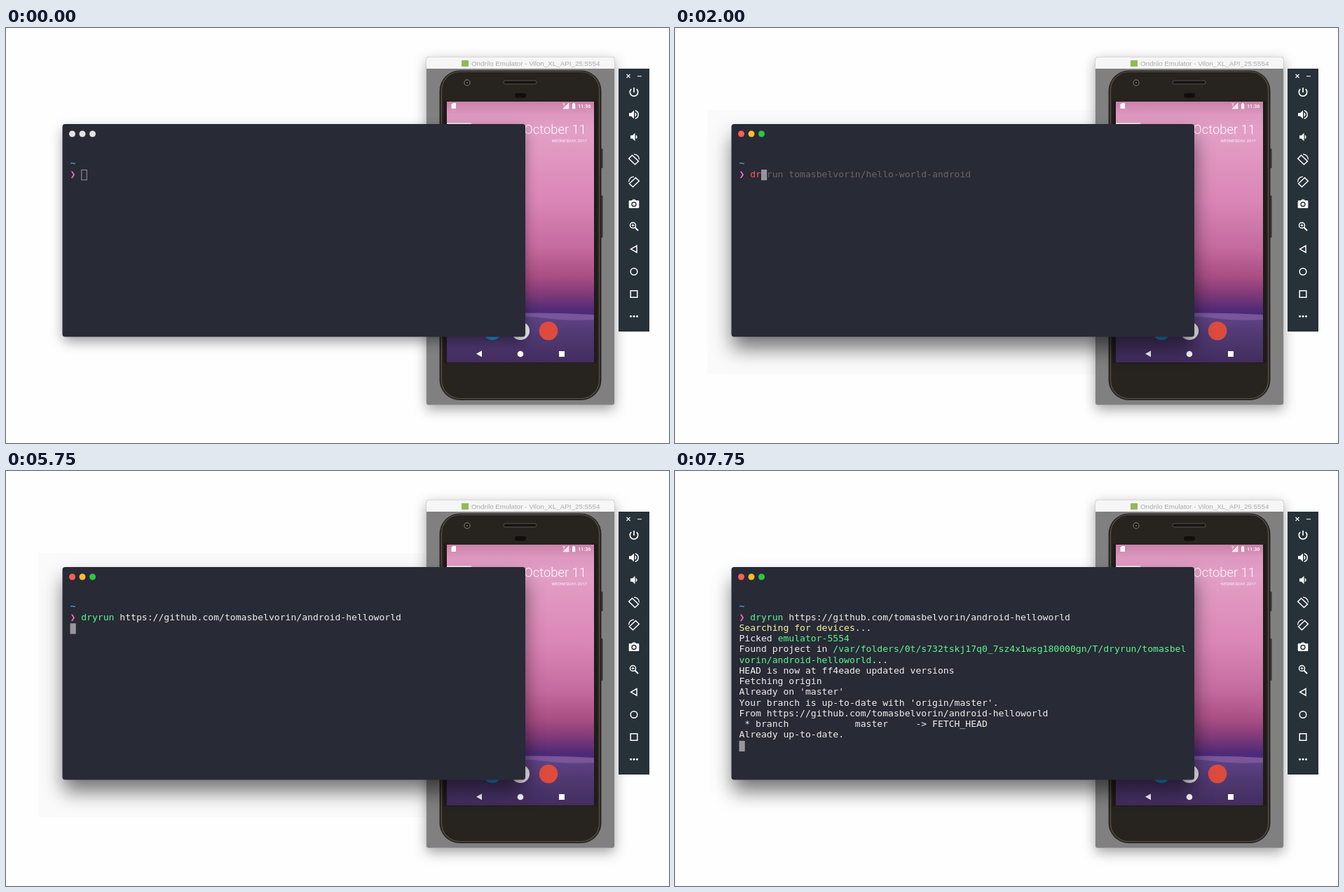
An HTML page for the animation above (8000 ms loop, 946 by 592 pixels).

```html
<!DOCTYPE html>
<html lang="en">
<head>
<meta charset="utf-8">
<title>Terminal and emulator</title>
<style>
  html, body { margin: 0; width: 100%; height: 100%; overflow: hidden; background: #fefefe; }
  svg { display: block; }
  .mono { font: 13.08px "DejaVu Sans Mono", "Liberation Mono", monospace; fill: #eff0eb; }
  .mono text, .mono tspan { white-space: pre; }
  .green { fill: #5af78e; }
  .red { fill: #ff5c57; }
  .yellow { fill: #f3f99d; }
  .ghost { fill: #686868; }
  .pink { fill: #ff6ac1; }
  .blue { fill: #57c7ff; }
  .title { font: 9.8px "Liberation Sans", sans-serif; fill: #a9a9a9; }
  .roboto { font-family: Roboto, sans-serif; fill: #fff; }
  .soft { filter: blur(9px); }
  .deep { filter: blur(14px); }
  .line { fill: none; stroke: #fff; stroke-width: 1.5; }
</style>
</head>
<body>
<svg width="946" height="592" viewBox="0 0 946 592">
  <defs>
    <linearGradient id="sky" gradientUnits="userSpaceOnUse" x1="0" y1="105" x2="0" y2="477">
      <stop offset="0" stop-color="#c981a8"/>
      <stop offset=".05" stop-color="#dd98bf"/>
      <stop offset=".12" stop-color="#e39fc6"/>
      <stop offset=".38" stop-color="#da86b6"/>
      <stop offset=".56" stop-color="#c46b9e"/>
      <stop offset=".67" stop-color="#aa4e83"/>
      <stop offset=".74" stop-color="#7f3a78"/>
      <stop offset=".8" stop-color="#4f2a77"/>
      <stop offset=".82" stop-color="#4b2a77"/>
    </linearGradient>
    <linearGradient id="hills" x1="0" y1="0" x2="0" y2="1">
      <stop offset="0" stop-color="#614489"/>
      <stop offset=".5" stop-color="#4e3870"/>
      <stop offset="1" stop-color="#422d5e"/>
    </linearGradient>
  </defs>

  <rect id="haze" x="46" y="117" width="620" height="377" fill="#fafafa"/>

  <!-- emulator window -->
  <rect class="soft" x="600" y="47" width="268" height="497" rx="4" fill-opacity=".36"/>
  <rect x="599.5" y="41" width="269" height="497" rx="4" fill="#bdbdbd"/>
  <path d="M600 58V45.500a4 4 0 0 1 4-4h260a4 4 0 0 1 4 4V58z" fill="#f6f6f6"/>
  <path d="M600 58h268v476a3.500 3.500 0 0 1-3.500 3.500h-261a3.500 3.500 0 0 1-3.500-3.500z" fill="#808080"/>
  <rect x="650" y="46" width="10" height="9" fill="#93b85c"/>
  <text class="title" x="664" y="54">Ondrilo Emulator - Vilon_XL_API_25:5554</text>

  <!-- phone -->
  <rect x="848" y="172" width="3.500" height="28" rx="1" fill="#38332e"/>
  <rect x="848" y="239" width="3.500" height="60" rx="1" fill="#38332e"/>
  <rect x="618.500" y="60.500" width="231" height="470.500" rx="29" fill="#2b2723"/>
  <rect x="621.500" y="62.500" width="225" height="466" rx="26" fill="#27231f" stroke="#59524a" stroke-width="1.200"/>
  <rect x="624" y="104" width="220" height="374" fill="#1f1c1a"/>
  <circle cx="658" cy="78" r="4" fill="#171412" stroke="#6d6761" stroke-width="1.400"/>
  <circle cx="658" cy="78" r="1.300" fill="#5b6068"/>
  <rect x="710" y="75" width="47" height="5" rx="2.500" fill="#151312" stroke="#5e5852" stroke-width=".9"/>
  <rect x="726" y="93" width="16" height="6.500" rx="3.250" fill="#110f0e"/>

  <rect x="629" y="105" width="210" height="372" fill="url(#sky)"/>
  <path d="M629 408Q735 405 839 410V477H629z" fill="url(#hills)"/>
  <path d="M700 407.500Q770 405 839 409V416Q800 418 770 414T700 412z" fill="#79559a"/>
  <rect x="629" y="135.500" width="35" height="6" fill="#fafafa"/>
  <path d="M635.500 109l2-2h4.500v8h-6.500z" fill="#fff"/>
  <path d="M794 108h4M796 108v4M803 107v8h-8z" fill="#fff" fill-opacity=".75" stroke="#fff" stroke-width=".7"/>
  <path d="M808 108h1v-1h2v1h1.200v7.200H808z" fill="#fff"/>
  <text class="roboto" x="834.500" y="114" font-size="7.300" font-weight="500" text-anchor="end">11:36</text>
  <text class="roboto" x="828" y="150.500" font-size="18.400" font-weight="300" text-anchor="end">October 11</text>
  <text class="roboto" x="829" y="162.500" font-size="6" text-anchor="end" opacity=".85">WEDNESDAY, 2017</text>
  <circle cx="694" cy="432" r="13" fill="#1c8fd0"/>
  <circle cx="734" cy="432" r="13" fill="#f1f1f1"/>
  <circle cx="774" cy="432" r="13.300" fill="#dd4b3e"/>
  <path d="M671 464.800l8-4.500v9zM789 461h8v8h-8z" fill="#fff"/>
  <circle cx="734" cy="465" r="4.300" fill="#fff"/>

  <!-- toolbar -->
  <rect x="874" y="58" width="44" height="375" fill="#263238"/>
  <path class="line" style="stroke-width:1.100" d="M885.500 66l5 5m0-5l-5 5M901 68.800h6"/>
  <g fill="#fff">
    <g transform="translate(896 91.500)">
      <path class="line" style="stroke-width:1.700" d="M0-6.500V.5M-3.700-4.400A5.700 5.700 0 1 0 3.700-4.400"/>
    </g>
    <g transform="translate(896 123.500)">
      <path d="M-7-2.200h3L0-6V6l-4-3.800h-3zM1.500-3.200a3.500 3.500 0 0 1 0 6.400z"/>
      <path class="line" d="M1.800-5.700a5.900 5.900 0 0 1 0 11.400"/>
    </g>
    <path transform="translate(896 155.500)" d="M-5-2.200h2.700L1.500-5.700V5.700l-3.800-3.500H-5zM2.700-3a3.300 3.300 0 0 1 0 6z"/>
    <g id="turn" class="line" transform="translate(896 187.500)">
      <path d="M-2.500-6L6.500 2.500 1.500 7.200-7.300-1.300z"/>
      <path d="M0-7.300A7.300 7.300 0 0 1 7.500 0" stroke-width="1.300"/>
    </g>
    <use href="#turn" transform="matrix(-1 0 0 1 1792 32)"/>
    <g transform="translate(896 251)">
      <path d="M-6-5h3l1.500-1.600h3L3-5h3a1.300 1.300 0 0 1 1.300 1.300v8.400A1.300 1.300 0 0 1 6 6H-6a1.300 1.300 0 0 1-1.300-1.300v-8.400A1.300 1.300 0 0 1-6-5z"/>
      <circle cy=".4" r="3.700" fill="#263238"/><circle cy=".4" r="2.200"/>
    </g>
    <g class="line" transform="translate(896 283)">
      <circle cx="-1.500" cy="-1.500" r="4"/>
      <path d="M1.500 1.500L6 6" stroke-width="2"/>
      <path d="M-3.500-1.500h4m-2-2v4" stroke-width="1"/>
    </g>
    <path class="line" d="M891.500 315.300l8.500-4.800v9.600z"/>
    <circle class="line" cx="896" cy="347.500" r="4.800"/>
    <path class="line" d="M891.200 374.700h9.600v9.600h-9.600z"/>
    <circle cx="891.500" cy="411.200" r="1.500"/><circle cx="896" cy="411.200" r="1.500"/><circle cx="900.500" cy="411.200" r="1.500"/>
  </g>

  <!-- terminal window -->
  <rect id="idleShade" class="soft" x="82" y="145" width="658" height="302" rx="4" fill-opacity=".4"/>
  <rect id="liveShade" class="deep" x="82" y="155" width="658" height="302" rx="4" fill-opacity=".54"/>
  <rect x="80.500" y="137" width="660.500" height="303.500" rx="4" fill="#282a36"/>
  <g id="dots">
    <circle cx="94.500" cy="151" r="4.500"/><circle cx="109" cy="151" r="4.500"/><circle cx="123.500" cy="151" r="4.500"/>
  </g>
  <g id="screen" class="mono"></g>
  <rect id="caret"/>
  <path id="mouse" d="M0 0V11.500L2.700 9l2 4.600 2-.9-2-4.400H8.400z" fill="#111" stroke="#fff" stroke-width=".9"/>
</svg>

<script>
const LOOP = 8000, COL = 7.87, ROW = 15.24, LEFT = 91.5, BASE = 212.7;
const $ = id => document.getElementById(id);

const user = 'tomasbelvorin';
const repo = 'https://github.com/' + user + '/android-helloworld';
const firstHint = 'dryrun ' + user + '/hello-world-android';
const fullCommand = 'dryrun ' + repo;

// time, typed characters, suggested line, command colour
const typing = [
  [0, 0, '', 'green'],
  [1750, 1, firstHint, 'green'],
  [2000, 2, firstHint, 'red'],
  [2250, 3, firstHint, 'red'],
  [2500, 5, firstHint, 'red'],
  [2750, 6, firstHint, 'green'],
  [3000, 7, firstHint, 'green'],
  [3750, 13, fullCommand, 'green'],
  [4000, 38, fullCommand, 'green'],
  [4250, fullCommand.length, fullCommand, 'green']
];

// time, number of output rows printed
const printing = [[0, -1], [5750, 0], [6500, 6], [7250, 8], [7750, 11]];

const output = [
  [['Searching for devices', 'yellow'], ['...']],
  [['Picked '], ['emulator-5554', 'green']],
  [['Found project in '], ['/var/folders/0t/s732tskj17q0_7sz4x1wsg180000gn/T/dryrun/' + user.slice(0, 8), 'green']],
  [[user.slice(8) + '/android-helloworld', 'green'], ['...']],
  [['HEAD is now at ff4eade updated versions']],
  [['Fetching origin']],
  [["Already on 'master'"]],
  [["Your branch is up-to-date with 'origin/master'."]],
  [['From ' + repo]],
  [[' * branch            master     -> FETCH_HEAD']],
  [['Already up-to-date.']]
];

// time, pointer position
const pointer = [[0], [500, 549.5, 187.5], [750, 530.5, 198.5], [1000, 536, 197.5], [1250, 926.5, 128], [1500]];

const latest = (steps, t) => steps.filter(s => s[0] <= t).pop();

function addRow(row, parts) {
  const text = document.createElementNS('http://www.w3.org/2000/svg', 'text');
  text.setAttribute('x', LEFT);
  text.setAttribute('y', BASE + row * ROW);
  for (const [str, tone] of parts) {
    const span = document.createElementNS(text.namespaceURI, 'tspan');
    span.textContent = str;
    if (tone) span.setAttribute('class', tone);
    text.append(span);
  }
  $('screen').append(text);
}

function setAttrs(el, attrs) {
  for (const key in attrs) el.setAttribute(key, attrs[key]);
}

let shown = '';
function draw(t) {
  const [, count, hint, tone] = latest(typing, t);
  const [, rows] = latest(printing, t);
  const [, mx, my] = latest(pointer, t);
  const live = t >= 1000;
  const haze = live && t < 7500;
  const key = [count, tone, rows, mx, live, haze].join();
  if (key === shown) return;
  shown = key;

  $('screen').replaceChildren();
  addRow(-1, [['~', 'blue']]);
  const typed = hint.slice(0, count);
  addRow(0, [['❯', 'pink'], [' '], [typed.slice(0, 6), tone], [typed.slice(6)], [hint.slice(count), 'ghost']]);
  output.slice(0, Math.max(rows, 0)).forEach((parts, i) => addRow(i + 1, parts));

  const col = rows < 0 ? count + 2 : 0;
  const inset = live ? 0 : 0.5;
  setAttrs($('caret'), {
    x: LEFT + col * COL + inset,
    y: 202 + (rows + 1) * ROW + inset,
    width: live ? 8.2 : 7.5,
    height: live ? 15.2 : 14.2,
    fill: live ? '#97979b' : 'none',
    stroke: live ? 'none' : '#97979b'
  });

  const lights = live ? ['#ff5f57', '#ffbd2e', '#28c940'] : ['#e2e2e2', '#e2e2e2', '#e2e2e2'];
  [...$('dots').children].forEach((dot, i) => dot.setAttribute('fill', lights[i]));
  $('idleShade').style.display = live ? 'none' : '';
  $('liveShade').style.display = live ? '' : 'none';
  $('haze').style.display = haze ? '' : 'none';
  $('mouse').style.display = mx ? '' : 'none';
  if (mx) $('mouse').setAttribute('transform', `translate(${mx} ${my})`);
}

const start = performance.now();
function tick() {
  draw((performance.now() - start) % LOOP);
  requestAnimationFrame(tick);
}
tick();
</script>
</body>
</html>
```
